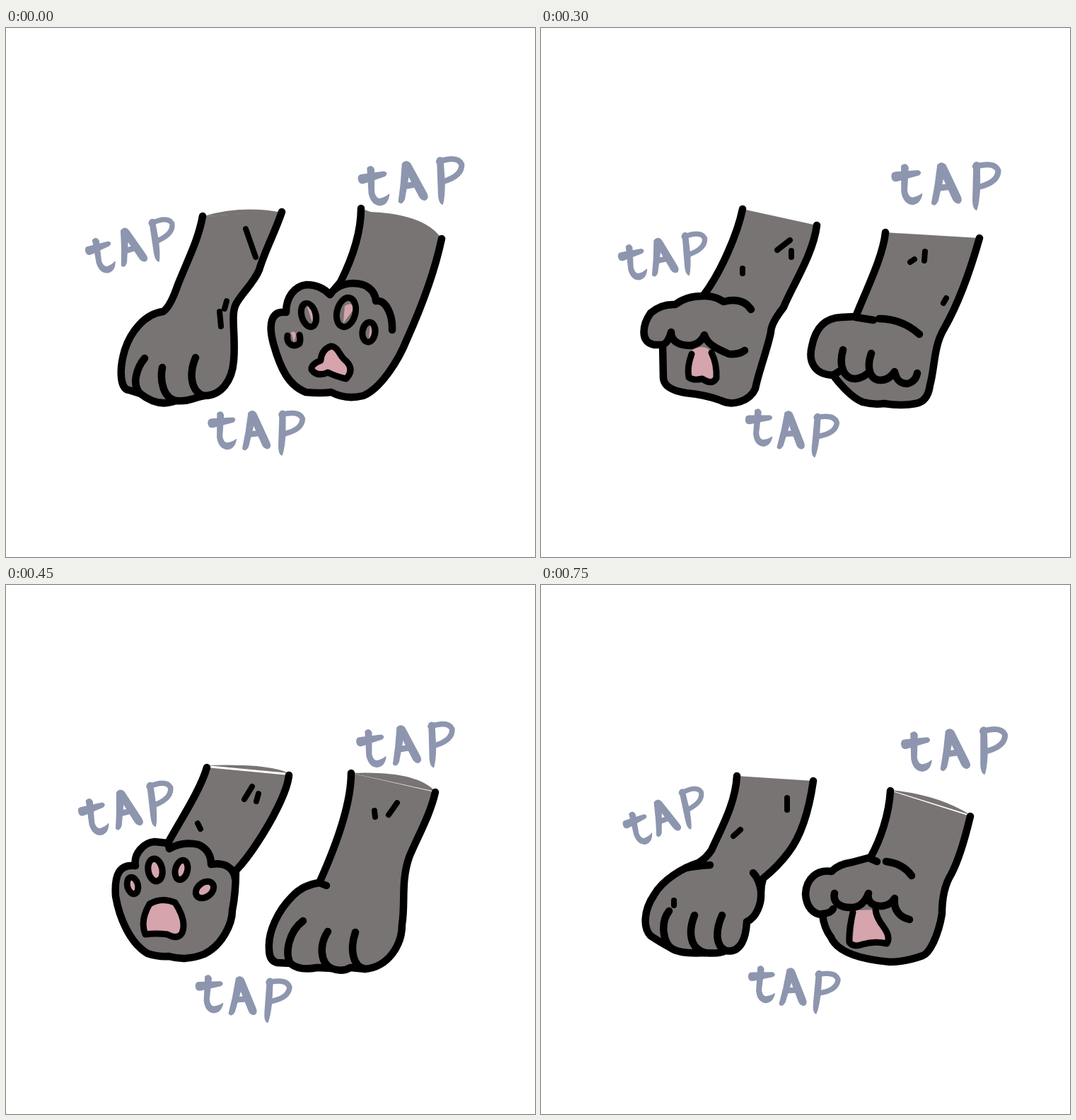
Animation of 748x748 px, one loop 0.9 s. Source, as an HTML page:

```html
<!DOCTYPE html>
<html lang="en">
<head>
<meta charset="utf-8">
<title>Tapping paws</title>
<style>
html, body { margin: 0; width: 100%; height: 100%; overflow: hidden; background: #fff; }
svg { display: block; width: 100%; height: 100%; }
.pose { visibility: hidden; animation: 900ms step-end infinite; }
#back { animation-name: back; }
#lift { animation-name: lift; }
#drop { animation-name: drop; }
#front { animation-name: front; }
@keyframes back { 0% { visibility: visible; } 16.6667%, 100% { visibility: hidden; } }
@keyframes lift {
  0% { visibility: hidden; } 16.6667% { visibility: visible; }
  33.3333% { visibility: hidden; } 83.3333%, 100% { visibility: visible; }
}
@keyframes drop {
  0% { visibility: hidden; } 33.3333% { visibility: visible; } 50% { visibility: hidden; }
  66.6667% { visibility: visible; } 83.3333%, 100% { visibility: hidden; }
}
@keyframes front {
  0% { visibility: hidden; } 50% { visibility: visible; } 66.6667%, 100% { visibility: hidden; }
}
path, ellipse { stroke-linecap: round; stroke-linejoin: round; }
.fur, .limb { fill: #787473; }
.limb, .ink, .bean { stroke: #000; stroke-width: 10.5; }
.ink { fill: none; }
.pink, .bean { fill: #d5a4ad; }
.bean, .thin { stroke-width: 9; }
.mark { fill: none; stroke: #000; stroke-width: 8; }
.letter path { fill: #8d96ae; stroke: #8d96ae; stroke-width: 1.5; }
.letter .bowl { fill: none; stroke-width: 8; }
</style>
</head>
<body>
<svg viewBox="0 0 748 748" role="img" aria-label="Two cat paws going tAP tAP tAP">
<defs>
  <g id="t" class="letter">
    <path d="M-2 3Q4-2 7 5L6 37Q8 47 14 47Q23 45 27 41Q25 55 14 56Q2 55-1 39Z"/>
    <path d="M-15 19Q-16 12-10 12L21 9Q27 11 22 15L-8 24Q-14 25-15 19Z"/>
  </g>
  <g id="A" class="letter">
    <path d="M-5 0Q0-6 6 0L4 12L-4 50Q-8 58-12 53L-8 28Z"/>
    <path d="M-5 0Q2-6 7 2L27 42Q31 50 25 52Q19 52 16 44Z"/>
    <path d="M-7 28L14 26V33L-8 36Z"/>
  </g>
  <g id="P" class="letter">
    <path d="M-4-4Q0-8 4-4L5 30Q4 52 1 60Q-4 58-4 45Z"/>
    <path class="bowl" d="M-2 0Q25-8 30 5Q30 21 4 28"/>
  </g>
</defs>

<!-- A limb is one open outline, from the right end of the cut over the paw to the left end. -->
<g id="back" class="pose">
  <path class="fur" d="M279 266Q335 250 390 261M502 260Q590 260 616 298"/>
  <path class="limb" d="M390 260C380 290 366 315 358 342C350 362 330 378 324 393C318 410 325 435 322 470C320 498 305 520 280 520C268 522 258 529 240 527Q215 537 190 517L174 512C162 511 159 485 168 455C176 430 196 404 222 401Q232 395 243 363C256 330 272 300 278 266"/>
  <path class="ink" d="M196 467C185 480 177 505 190 517M221 480C217 502 224 523 240 527M268 466C258 490 262 515 280 520"/>
  <path class="mark" d="M339 284L353 324M312 386L309 397M302 401L304 422"/>
  <path class="limb" d="M616 298C605 350 585 400 567 440C555 470 530 510 505 520Q480 526 460 515Q445 517 424 515C400 506 388 482 378 446C371 420 374 399 396 402C396 380 408 365 425 363Q445 363 458 377L473 359C490 325 502 290 502 255"/>
  <path class="ink" d="M458 377C468 362 488 358 505 363Q522 370 523 386C537 384 547 405 546 427"/>
  <path class="ink thin" d="M398 435C396 447 407 453 415 446Q417 440 415 434"/>
  <g class="ink thin">
    <ellipse cx="428" cy="406" rx="10" ry="17" transform="rotate(-16 428 406)"/>
    <ellipse cx="481" cy="402" rx="13" ry="21" transform="rotate(14 481 402)"/>
    <ellipse cx="513" cy="430" rx="9" ry="14" transform="rotate(8 513 430)"/>
  </g>
  <path class="pink" d="M425 392Q436 400 433 416ZM479 393Q492 385 490 400L477 417ZM515 420Q519 432 513 440ZM403 430Q414 427 407 444Z"/>
  <path class="bean" d="M459 450C470 450 471 464 481 471Q493 483 481 496Q467 493 455 487Q440 494 432 483Q431 476 445 470Q446 455 459 450Z"/>
</g>

<g id="lift" class="pose">
  <path class="fur" d="M494 290Q560 296 607 325"/>
  <path class="limb" d="M385 277C380 312 370 352 350 378Q335 398 314 415Q311 425 311 435C312 450 305 470 291 476C290 498 283 521 261 517Q252 522 232 520Q198 522 185 514Q165 503 155 496C144 485 145 460 160 438C172 417 200 400 222 393Q233 387 241 375C256 342 275 308 277 270"/>
  <path class="ink" d="M239 396Q220 397 205 400M300 407Q308 415 311 432M181 461C168 478 173 506 185 514M217 467C208 490 210 514 232 520M256 467C246 490 247 510 261 517"/>
  <path class="mark" d="M348 301V318M282 346L272 355M188 446V453"/>
  <path class="limb" d="M607 327C598 365 590 390 580 409Q567 430 567 465C562 495 550 520 540 524Q515 533 493 533C460 530 420 522 410 498Q400 485 398 466C385 466 375 455 374 437C375 415 390 402 411 405Q420 395 440 392L466 385C480 360 492 325 494 291"/>
  <path class="pink" d="M445 460L472 459L490 502L440 508Z"/>
  <path class="ink" d="M466 387L475 391M488 391Q512 394 524 411M398 465Q410 464 413 458M415 436C412 450 425 457 440 456Q456 455 463 436C460 448 470 455 483 454Q495 452 500 443C498 460 508 470 521 473"/>
  <path class="ink thin" d="M441 463Q435 487 436 505Q441 513 455 508Q472 503 489 507Q495 498 484 483Q474 470 473 459"/>
</g>

<g id="drop" class="pose">
  <path class="limb" d="M390 279C385 320 355 365 343 395Q325 418 325 430C320 455 308 485 303 510C295 528 270 535 255 527Q235 519 205 516Q174 511 173 495L172 448H160C140 445 143 420 155 403Q170 390 190 391Q205 379 229 379C255 345 278 290 285 256"/>
  <path class="pink" d="M212 457Q227 445 241 457L246 498L232 493L211 496Z"/>
  <path class="ink" d="M229 379Q245 378 258 387Q285 380 297 398M172 448Q180 445 184 430C184 446 200 449 212 449Q226 446 231 434C236 450 255 456 266 461Q280 462 288 456"/>
  <path class="ink thin" d="M213 461Q206 480 209 494Q215 499 228 496Q242 506 248 495Q249 475 241 459"/>
  <path class="mark" d="M334 314L352 300M354 315V324M285 340V347"/>
  <path class="limb" d="M620 297C605 350 590 390 570 425C555 450 557 480 550 505Q547 528 530 531Q510 535 485 531Q470 533 455 529Q437 522 413 491C385 490 378 470 383 450C388 425 400 410 425 409L445 408C460 370 484 322 487 289"/>
  <path class="ink" d="M445 409L470 413M478 411Q510 411 535 433M413 491L424 484M427 455C420 480 430 497 445 496Q458 494 465 485M467 460C460 480 465 498 480 498Q492 498 500 486C503 500 510 503 518 503Q530 500 532 488"/>
  <path class="mark" d="M528 327L522 331M543 316L542 329M573 382L569 389"/>
</g>

<g id="front" class="pose">
  <path class="fur" d="M284 255Q370 252 400 266M488 266Q580 262 607 292"/>
  <path class="limb" d="M400 269C398 292 375 335 355 365Q340 388 325 404C325 420 323 445 320 460C320 480 305 510 280 522Q255 532 230 525Q215 526 200 521C175 506 160 470 155 440C153 410 160 394 183 397C180 380 195 364 210 363L229 365C245 335 275 290 284 258"/>
  <path class="ink" d="M229 365L231 373Q250 362 272 367Q290 375 290 395C310 392 322 400 324 415"/>
  <g class="bean">
    <ellipse cx="179" cy="425" rx="7.5" ry="12" transform="rotate(-14 179 425)"/>
    <ellipse cx="211" cy="403" rx="10" ry="16" transform="rotate(-10 211 403)"/>
    <ellipse cx="248" cy="403" rx="8.5" ry="14" transform="rotate(14 248 403)"/>
    <ellipse cx="281" cy="431" rx="14" ry="10" transform="rotate(-38 281 431)"/>
  </g>
  <path class="bean" d="M197 494Q189 475 203 451Q220 441 239 449Q256 475 249 492Q243 502 228 494Q212 492 197 494Z"/>
  <path class="mark" d="M348 285L337 303M357 295L354 306M271 337L275 345"/>
  <path class="limb" d="M607 293C600 325 580 360 570 385C558 420 565 450 560 480C560 510 540 540 508 543L487 541Q475 548 460 542L440 541Q415 546 402 535L383 534Q372 531 372 515C370 490 385 460 405 440Q420 424 443 421C475 350 488 300 488 266"/>
  <path class="ink" d="M443 421L453 425M420 475C400 490 394 520 402 535M455 490C442 510 445 535 460 542M494 491C486 515 490 540 508 543"/>
  <path class="mark" d="M521 319L522 328M553 308L541 325"/>
</g>
</svg>
<script>
// Each word runs from the top of its t to the top of its P.
const words = {
  back: [[124, 297, 207, 276], [513, 195, 614, 189], [301, 542, 391, 547]],
  lift: [[126, 321, 200, 294], [525, 207, 626, 207], [309, 538, 393, 551]],
  drop: [[122, 306, 204, 295], [512, 192, 616, 196], [305, 538, 391, 551]],
  front: [[115, 302, 204, 285], [510, 204, 602, 200], [284, 551, 373, 562]]
};

// Letters follow the line but tilt less than it; narrower words have slightly smaller letters.
function drawWord([x, y, endX, endY]) {
  const dx = endX - x, dy = endY - y;
  const tilt = Math.atan2(dy, dx) * 180 / Math.PI * 0.6;
  const size = 0.5 + dx / 200;
  return [['t', 0], ['A', 0.52], ['P', 1]].map(([letter, along]) =>
    `<use href="#${letter}" transform="translate(${x + dx * along} ${y + dy * along}) rotate(${tilt}) scale(${size})"/>`).join('');
}

for (const [pose, list] of Object.entries(words))
  document.getElementById(pose).insertAdjacentHTML('beforeend', list.map(drawWord).join(''));
</script>
</body>
</html>
```
